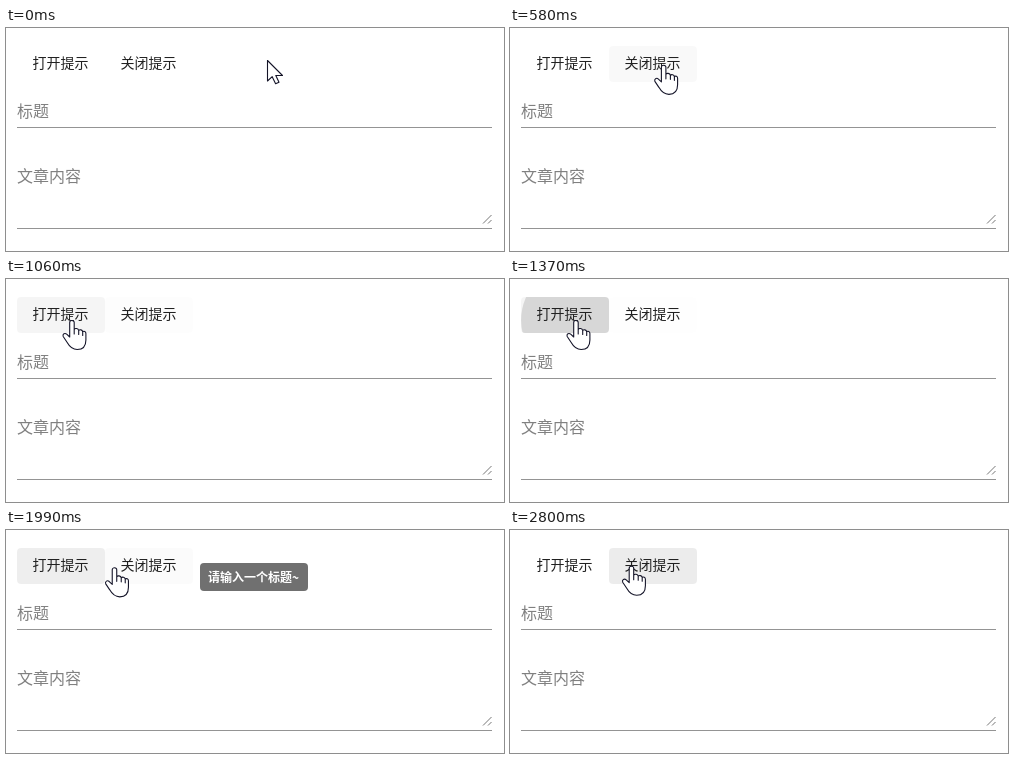
Write an HTML page that moves like this. It is 498 px wide and 223 px high and loops after 2.82 s.

```html
<!DOCTYPE html>
<html lang="zh-CN">
<head>
<meta charset="utf-8">
<title>提示</title>
<style>
  html, body { margin: 0; width: 100%; height: 100%; overflow: hidden; background: #fff; }
  svg { display: block; width: 498px; height: 223px; }
  text { font-family: "Noto Sans CJK SC", "Noto Sans CJK", "Noto Sans", sans-serif; font-weight: 350; }
  .btn { font-size: 14px; fill: #212121; }
  .label { font-size: 16px; fill: #808080; }
  .tip { font-size: 12px; font-weight: 700; fill: #fff; }
  .rule { fill: #949494; }
  .grip { stroke: #777; fill: none; }
  .cursor { fill: #fff; stroke: #141428; stroke-width: 1.1; stroke-linejoin: round; stroke-linecap: round; }
</style>
</head>
<body>
<svg viewBox="0 0 498 223">
  <defs>
    <clipPath id="openClip"><rect x="11" y="18" width="88" height="36" rx="4"/></clipPath>
    <clipPath id="closeClip"><rect x="99" y="18" width="88" height="36" rx="4"/></clipPath>
  </defs>

  <g clip-path="url(#openClip)">
    <rect id="openHover" x="11" y="18" width="88" height="36"/>
    <circle id="openRipple" cx="66" cy="41"/>
  </g>
  <g clip-path="url(#closeClip)">
    <rect id="closeHover" x="99" y="18" width="88" height="36"/>
    <circle id="closeRipple" cx="121.5" cy="36"/>
  </g>
  <text class="btn" x="26.5" y="40">打开提示</text>
  <text class="btn" x="114.5" y="40">关闭提示</text>

  <text class="label" x="11" y="89">标题</text>
  <rect class="rule" x="11" y="99" width="475" height="1"/>
  <text class="label" x="11" y="154">文章内容</text>
  <rect class="rule" x="11" y="200" width="475" height="1"/>
  <path class="grip" d="M477 195.5L485.5 187M482 195.5L485.5 192"/>

  <g id="tip">
    <rect x="194" y="33" width="108" height="28" rx="4" fill="#616161" fill-opacity=".9"/>
    <text class="tip" x="202" y="52">请输入一个标题~</text>
  </g>

  <path id="arrow" class="cursor" d="M.5 .5V21L5.2 16.7L8.6 23.8L12 22.2L8.8 15.5H15.5Z"/>
  <path id="hand" class="cursor" d="M-2 17V2.5C-2 -.2 2.5 -.2 2.5 2.5V9.5C3.2 8 6.6 8.2 7 10.5C8 9.3 10.6 9.7 11 11.7C12.2 10.8 14.2 11.5 14.2 13.5V20C14.2 26 11 29.5 5.5 29.5C0 29.5 -2.8 25.5 -4.5 22.5L-8.5 16.5C-9.5 14 -6.8 12.6 -5 14.2ZM2.5 9.5V14M7 10.5V14.5M11 11.7V15.5"/>
</svg>
<script>
const LOOP = 2820;
const HOVER = .04, INK = .16;
const $ = id => document.getElementById(id);
const clamp = v => Math.max(0, Math.min(1, v));
const easeOut = (p, power) => 1 - (1 - clamp(p)) ** power;
const decay = (age, tau) => Math.exp(-Math.max(0, age) / tau);

// Pointer waypoints: time, x, y
const path = [
  [210, 261, 32], [370, 213, 37], [770, 100, 36.7], [960, 54, 43],
  [1060, 65.7, 41], [1600, 65.7, 41], [1700, 79, 41], [2120, 121.2, 35.7]
];

// When the pointer is over each button, and when it is pressed
const buttons = [
  { id: "open", stays: [[774, 1898]], press: 1250, release: 1720 },
  { id: "close", stays: [[462, 774], [1898, LOOP]], press: 2220, release: 2507 }
];

function pointer(t) {
  const k = path.findIndex(p => p[0] > t);
  if (k === 0) return path[0].slice(1);
  if (k < 0) return path[path.length - 1].slice(1);
  const a = path[k - 1], b = path[k], p = (t - a[0]) / (b[0] - a[0]);
  return [1, 2].map(i => a[i] + (b[i] - a[i]) * p);
}

function drawButton({ id, stays, press, release }, t) {
  const hover = ([enter, leave]) => HOVER * clamp((t - enter) / 220) * decay(t - leave, 200);
  $(id + "Hover").setAttribute("opacity", Math.max(...stays.map(hover)));
  const age = t - press;
  $(id + "Ripple").setAttribute("r", 80 * easeOut(age / 275, 2));
  $(id + "Ripple").setAttribute("opacity", INK * clamp(age / 160) * decay(t - release, 200));
}

function draw(t) {
  const [x, y] = pointer(t);
  const shape = x < 187 ? "hand" : "arrow";
  for (const id of ["hand", "arrow"]) {
    $(id).setAttribute("transform", `translate(${x} ${y})`);
    $(id).setAttribute("opacity", id === shape ? 1 : 0);
  }
  for (const button of buttons) drawButton(button, t);
  $("tip").setAttribute("opacity", easeOut((t - 1380) / 220, 3) * decay(t - 2290, 36));
}

const begin = performance.now();
function tick() {
  draw((performance.now() - begin) % LOOP);
  requestAnimationFrame(tick);
}
draw(0);
requestAnimationFrame(tick);
</script>
</body>
</html>
```
